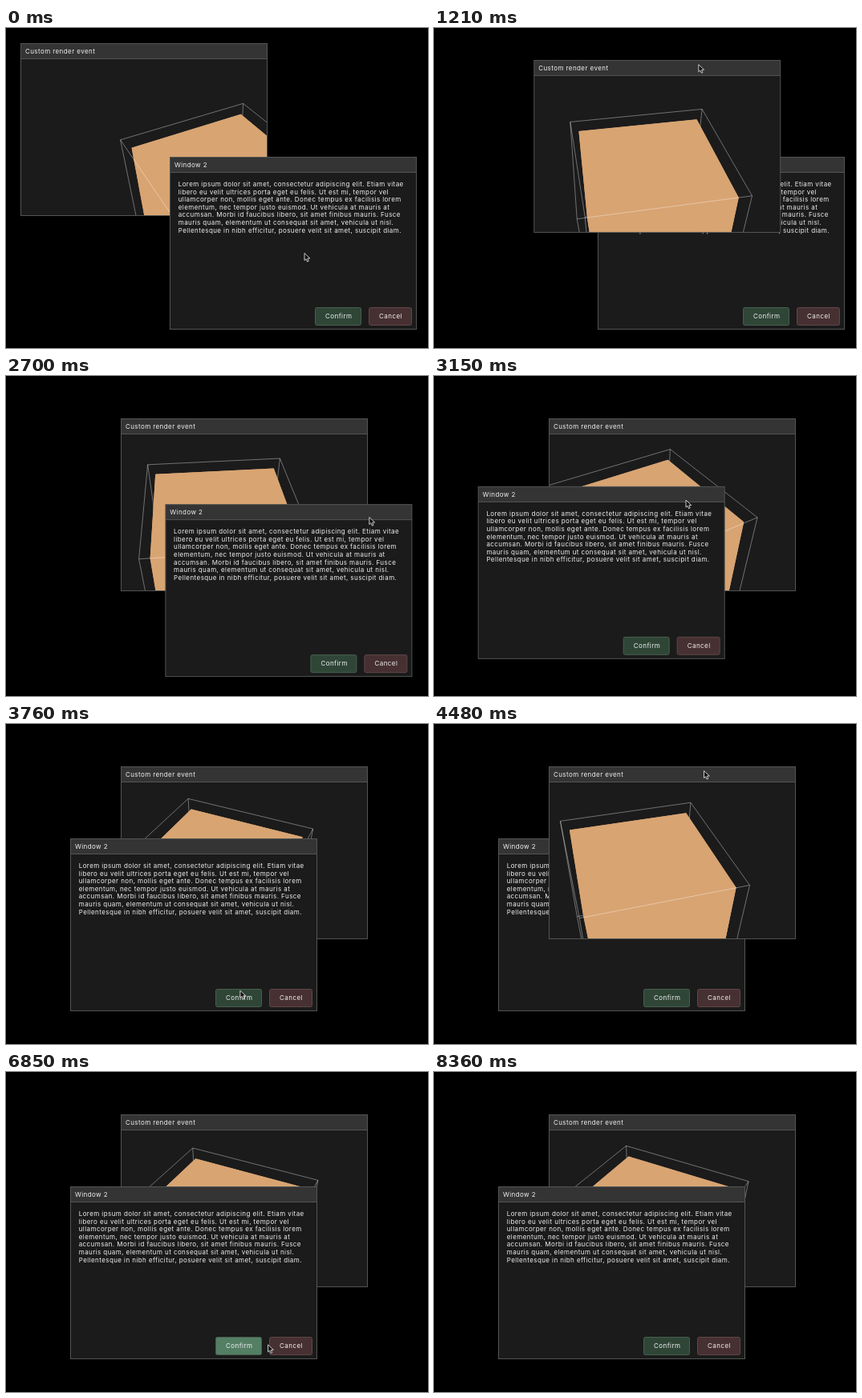
Recreate the animation shown at these times as an HTML page with a canvas. Size 526 px wide and 400 px high, loop 8390 ms.

```html
<!DOCTYPE html>
<html>
<head>
<meta charset="utf-8">
<style>
html, body { margin: 0; width: 100%; height: 100%; overflow: hidden; background: #000; }
canvas { display: block; }
</style>
</head>
<body>
<canvas id="stage" width="526" height="400"></canvas>
<script>
const ctx = document.getElementById('stage').getContext('2d');
const { sin, cos, PI } = Math;
const LOOP = 8390, W = 307, H = 215, TITLE = 19;

const LINES = [
  'Lorem ipsum dolor sit amet, consectetur adipiscing elit. Etiam vitae',
  'libero eu velit ultrices porta eget eu felis. Ut est mi, tempor vel',
  'ullamcorper non, mollis eget ante. Donec tempus ex facilisis lorem',
  'elementum, nec tempor justo euismod. Ut vehicula at mauris at',
  'accumsan. Morbi id faucibus libero, sit amet finibus mauris. Fusce',
  'mauris quam, elementum ut consequat sit amet, vehicula ut nisl.',
  'Pellentesque in nibh efficitur, posuere velit sit amet, suscipit diam.'
];

const BUTTONS = [
  { label: 'Confirm', x: 181, w: 57, idle: '#2f4637', hover: '#547f64', edge: '#465e4e' },
  { label: 'Cancel', x: 248, w: 53, idle: '#473032', hover: '#805456', edge: '#5f4648' }
];
const BUTTON_Y = 188, BUTTON_H = 22;

// Pointer moves: start, end, then where to.
const MOVES = [
  [250, 800, 234, 29],
  [1000, 1900, 359, 63],
  [2150, 2600, 461.5, 177],
  [2700, 3300, 337.5, 159.5],
  [3420, 3800, 290, 338],
  [3900, 4250, 336, 58],
  [4500, 4850, 137, 235],
  [5100, 5500, 288, 342],
  [5900, 6150, 345, 342],
  [6350, 6600, 295, 343],
  [6690, 7250, 450, 330]
];

function smooth(t, from, to) {
  const u = Math.min(1, Math.max(0, (t - from) / (to - from)));
  return u * u * (3 - 2 * u);
}

const mix = (a, b, u) => a.map((v, i) => v + (b[i] - v) * u);

// Picked up, swung round twice, put down.
function renderPlace(t) {
  const turn = 2 * PI * (t - 1210) / 400;
  const swing = [125.5 - 47 * sin(turn), 90 - 56 * cos(turn - 0.5)];
  const lifted = mix([18.5, 19.5], swing, smooth(t, 880, 1000));
  return mix(lifted, [143.5, 53.5], smooth(t, 1840, 1945));
}

function textPlace(t) {
  const left = mix([204.5, 161.5], [53.5, 138], smooth(t, 2650, 3090));
  return mix(left, [80.5, 143.5], smooth(t, 3110, 3380));
}

// A dragged window trails the pointer a little.
function dragging(place, t, dx, dy) {
  const [x, y] = place(t + 15);
  return [x + dx, y + dy];
}

function pointer(t) {
  if (t > 860 && t < 2100) return dragging(renderPlace, t, 215.5, 9.5);
  if (t > 2620 && t < 3400) return dragging(textPlace, t, 257, 16);
  return MOVES.reduce((p, [from, to, x, y]) => mix(p, [x, y], smooth(t, from, to)), [371.5, 281]);
}

function polygon(points) {
  ctx.beginPath();
  points.forEach(p => ctx.lineTo(p[0], p[1]));
  ctx.closePath();
}

function text(str, x, y) {
  ctx.fillStyle = '#f0f0f0';
  ctx.fillText(str, x, y);
}

// The cube turns about an axis slightly off its centre, seen from above.
const PITCH_COS = 0.748, PITCH_SIN = 0.663, OUTER = 0.1985, INNER = 0.1775, OFF_AXIS = 0.0069;

function cube(half, angle) {
  const r = half * Math.SQRT2, shift = angle + 2.8;
  return [half, -half].map(level => [0, 1, 2, 3].map(k => {
    const a = angle + k * PI / 2;
    const x = r * sin(a) + OFF_AXIS * sin(shift);
    const z = -r * cos(a) - OFF_AXIS * cos(shift);
    const y = level - 0.0805;
    const depth = 1 - (y - 0.118) * PITCH_SIN - z * PITCH_COS;
    return [266.5 + 480 * x / depth, 200 - 480 * (y * PITCH_COS - z * PITCH_SIN) / depth];
  }));
}

function drawCube(t) {
  const s = t / 1000, angle = 0.262 - s - 0.023 * cos(s - 1.5);
  const [top, bottom] = cube(OUTER, angle);
  const [lid, base] = cube(INNER, angle);
  const facing = k => -cos(angle + k * PI / 2 + PI / 4) * 0.806 > OUTER;
  const posts = front => {
    ctx.beginPath();
    for (let k = 0; k < 4; k++) {
      if ((facing(k) || facing(k + 3)) !== front) continue;
      ctx.moveTo(...top[k]);
      ctx.lineTo(...bottom[k]);
    }
    ctx.stroke();
  };
  ctx.lineWidth = 0.9;
  ctx.strokeStyle = 'rgba(255,255,255,.42)';
  posts(false);
  polygon(bottom);
  ctx.stroke();
  ctx.fillStyle = '#d8a472';
  const sides = lid.map((corner, k) => {
    const n = (k + 1) % 4;
    return [corner, lid[n], base[n], base[k]];
  });
  [base, ...sides, lid].forEach(face => { polygon(face); ctx.fill(); });
  posts(true);
  polygon(top);
  ctx.stroke();
}

function drawWindow(x, y, title, content) {
  ctx.save();
  ctx.beginPath();
  ctx.rect(x, y, W, H);
  ctx.clip();
  ctx.fillStyle = '#1b1b1b';
  ctx.fillRect(x, y, W, H);
  content();
  ctx.fillStyle = '#343434';
  ctx.fillRect(x, y, W, TITLE);
  ctx.restore();
  ctx.lineWidth = 1;
  ctx.strokeStyle = '#525553';
  ctx.strokeRect(x, y, W, H);
  ctx.beginPath();
  ctx.moveTo(x, y + TITLE);
  ctx.lineTo(x + W, y + TITLE);
  ctx.stroke();
  text(title, x + 5.4, y + 12.4);
}

function drawTextPanel(x, y, mouse) {
  LINES.forEach((line, i) => text(line, x + 10.2, y + 36.5 + i * 9.6));
  for (const b of BUTTONS) {
    const mx = mouse[0] - x - b.x, my = mouse[1] - y - BUTTON_Y;
    const over = mx >= 0 && mx <= b.w && my >= 0 && my <= BUTTON_H;
    ctx.beginPath();
    ctx.roundRect(x + b.x, y + BUTTON_Y, b.w, BUTTON_H, 2);
    ctx.fillStyle = over ? b.hover : b.idle;
    ctx.fill();
    ctx.lineWidth = 1;
    ctx.strokeStyle = b.edge;
    ctx.stroke();
    text(b.label, x + b.x + 12.6, y + BUTTON_Y + 13.5);
  }
}

function drawPointer([x, y]) {
  const shape = [[0, 0], [0, 9], [2, 7.2], [3.6, 10.6], [5.2, 9.8], [3.8, 6.6], [6.8, 6.4]];
  polygon(shape.map(p => [x + p[0] + 0.5, y + p[1] + 0.5]));
  ctx.fillStyle = '#111';
  ctx.fill();
  ctx.lineWidth = 0.9;
  ctx.strokeStyle = '#ddd';
  ctx.stroke();
}

function draw(t) {
  ctx.fillStyle = '#000';
  ctx.fillRect(0, 0, 526, 400);
  ctx.font = '8px Inter, sans-serif';
  ctx.letterSpacing = '0.42px';

  const [rx, ry] = renderPlace(t), [tx, ty] = textPlace(t);
  const renderOnTop = (t > 870 && t < 2630) || (t > 4250 && t < 4850);
  const mouse = renderOnTop ? [-99, -99] : pointer(t - 30);
  const windows = [
    () => drawWindow(rx, ry, 'Custom render event', () => drawCube(t)),
    () => drawWindow(tx, ty, 'Window 2', () => drawTextPanel(tx, ty, mouse))
  ];
  if (renderOnTop) windows.reverse();
  windows.forEach(paint => paint());
  if (t < 7640) drawPointer(pointer(t));
}

const start = performance.now();
function tick() {
  draw((performance.now() - start) % LOOP);
  requestAnimationFrame(tick);
}
tick();
</script>
</body>
</html>
```
